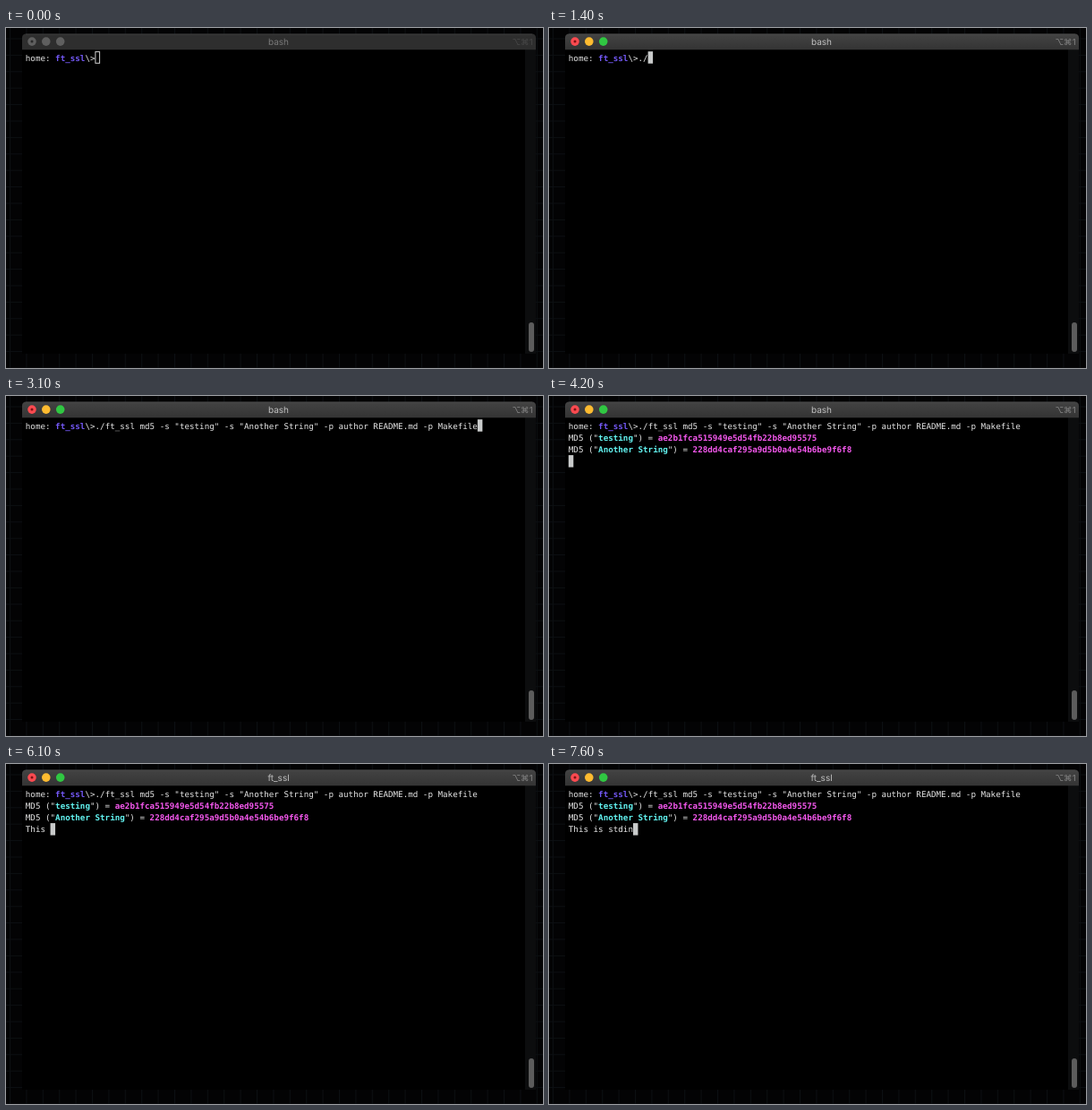
These frames come from a looping animation (600x380 px, 8000 ms). An HTML page:

```html
<!DOCTYPE html>
<html lang="en">
<head>
<meta charset="utf-8">
<title>Terminal session</title>
<style>
  html, body { margin: 0; width: 100%; height: 100%; overflow: hidden; background: #030304; }
  svg { display: block; width: 600px; height: 380px; }
  text { white-space: pre; text-rendering: geometricPrecision; }
  .term { font: 9.22px "DejaVu Sans Mono", monospace; fill: #e6e6e6; }
  .bar { font: 10px Inter, sans-serif; fill: #c0c0c0; }
  .keys { font-size: 9.5px; fill: #868686; }
  .dir, .arg, .hash { font-weight: bold; }
  .dir { fill: #7358f5; }
  .arg { fill: #62f3f0; }
  .hash { fill: #f558ee; }
  .red { fill: #fb4a50; }
  .yellow { fill: #fdbb30; }
  .green { fill: #30c742; }
  .dot { fill: #7d1215; }
  #caret { fill: #c9cbcb; }
  .idle #frame { fill: #2e2e2e; }
  .idle .light { fill: #5f5f5f; }
  .idle .dot { fill: #2a2a2a; }
  .idle .bar { fill: #797979; }
  .idle .keys { fill: #484848; }
  .idle #caret { fill: none; stroke: #d0d0d0; }
</style>
</head>
<body>
<svg id="stage" class="idle" viewBox="0 0 600 380">
  <defs>
    <pattern id="grid" x="4" y="11.5" width="18.4" height="18.4" patternUnits="userSpaceOnUse">
      <path d="M.5 0V18.4M0 .5H18.4" stroke="#0c0f12" fill="none"/>
    </pattern>
    <linearGradient id="metal" x2="0" y2="1">
      <stop stop-color="#434343"/>
      <stop offset="1" stop-color="#343434"/>
    </linearGradient>
    <path id="beam" d="M-3-5.5Q0-5.5 0-3.5Q0-5.5 3-5.5M0-3.5V3.5M-3 5.5Q0 5.5 0 3.5Q0 5.5 3 5.5M-1.5 0H1.5"/>
  </defs>
  <rect width="600" height="380" fill="#030304"/>
  <rect width="600" height="380" fill="url(#grid)"/>

  <rect x="18" y="24" width="574" height="340"/>
  <rect x="580" y="24" width="12" height="340" fill="#0c0d0e"/>
  <rect x="584" y="329" width="6" height="33" rx="3" fill="#5c5c5c"/>

  <path id="frame" d="M18 24.3V11q0-4.5 4.5-4.5H587.5q4.5 0 4.5 4.5V24.3z" fill="url(#metal)"/>
  <path d="M22 7H588" stroke="#555" stroke-opacity=".4"/>
  <circle class="light red" cx="29" cy="15.1" r="4.8"/>
  <circle class="dot" cx="29" cy="15.1" r="1.5"/>
  <circle class="light yellow" cx="44.8" cy="15.1" r="4.8"/>
  <circle class="light green" cx="60.7" cy="15.1" r="4.8"/>
  <text id="title" class="bar" x="304.5" y="19" text-anchor="middle">bash</text>
  <text class="bar keys" x="588.5" y="18.8" text-anchor="end">⌥⌘1</text>

  <rect id="caret" width="5.5" height="13.5"/>
  <g class="term">
    <text x="21.8" y="36.5">home: <tspan class="dir">ft_ssl</tspan>\&gt;<tspan id="command"></tspan></text>
    <g id="output">
      <text x="21.8" y="49.8">MD5 ("<tspan class="arg">testing</tspan>") = <tspan class="hash">ae2b1fca515949e5d54fb22b8ed95575</tspan></text>
      <text x="21.8" y="63.1">MD5 ("<tspan class="arg">Another String</tspan>") = <tspan class="hash">228dd4caf295a9d5b0a4e54b6be9f6f8</tspan></text>
    </g>
    <text id="input" x="21.8" y="76.4"></text>
  </g>

  <g id="pointer" fill="none" stroke-linecap="round">
    <use href="#beam" stroke="#e4e4e4" stroke-width="2.8"/>
    <use href="#beam" stroke="#111"/>
  </g>
</svg>
<script>
  const LOOP = 8000, LEFT = 21.8, CELL = 5.55, ROW = 13.3, PROMPT = 14;
  const COMMAND = './ft_ssl md5 -s "testing" -s "Another String" -p author README.md -p Makefile';
  const INPUT = 'This is stdin';

  // [time, characters visible]
  const commandKeys = [[1200, 1], [1400, 2], [1700, 4], [1900, 9], [3100, COMMAND.length]];
  const inputKeys = [5400, 5600, 5700, 5900, 6000, 6300, 6400, 6600, 6800, 6900, 7200, 7400, 7500]
    .map((time, i) => [time, i + 1]);
  const pointerStops = [[200, [73, 130]], [300, [200, 195]], [400, [257, 216]]];

  const $ = id => document.getElementById(id);
  const [stage, title, caret, command, output, input, pointer] =
    ['stage', 'title', 'caret', 'command', 'output', 'input', 'pointer'].map($);

  const at = (keys, t, initial) =>
    keys.reduce((value, [time, next]) => t >= time ? next : value, initial);

  const show = (el, on) => el.style.display = on ? '' : 'none';

  function draw(now) {
    const t = now % LOOP;
    const idle = t < 600, done = t >= 4200;
    const typed = at(commandKeys, t, 0), entered = at(inputKeys, t, 0);

    stage.classList.toggle('idle', idle);
    title.textContent = t < 4700 ? 'bash' : 'ft_ssl';
    command.textContent = COMMAND.slice(0, typed);
    input.textContent = INPUT.slice(0, entered);
    show(output, done);

    const col = done ? entered : PROMPT + typed;
    const inset = idle ? .4 : 0;
    caret.setAttribute('x', LEFT + col * CELL + inset);
    caret.setAttribute('y', 26.2 + (done ? 3 * ROW : 0) + inset);
    caret.setAttribute('width', 5.5 - 2 * inset);
    caret.setAttribute('height', 13.5 - 2 * inset);

    show(pointer, t >= 200 && t < 1200);
    pointer.setAttribute('transform', `translate(${at(pointerStops, t, [0, 0])})`);
    requestAnimationFrame(draw);
  }
  draw(performance.now());
</script>
</body>
</html>
```
